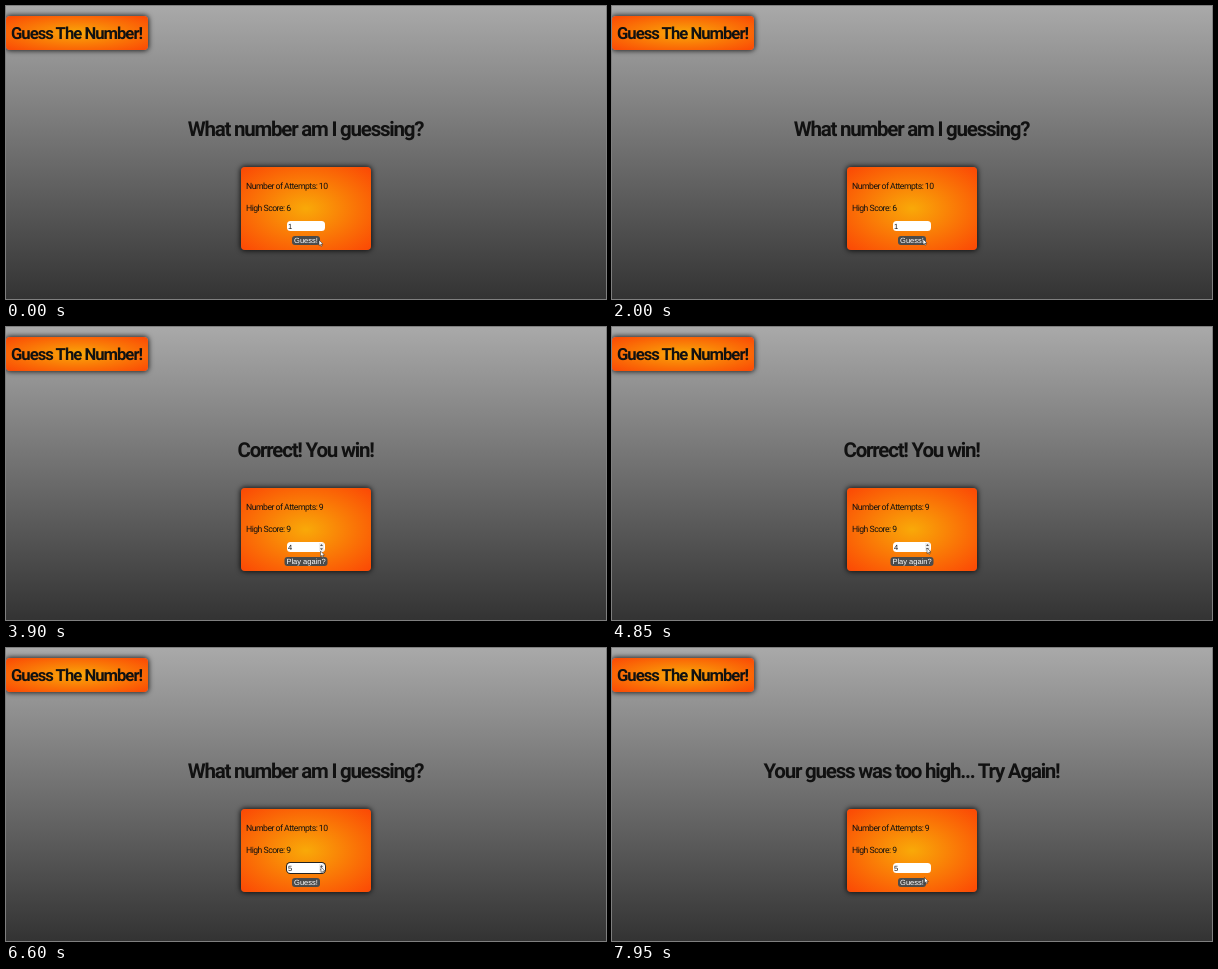
These frames come from a looping animation (600x293 px, 8000 ms). An HTML page:

```html
<!DOCTYPE html>
<html lang="en">
<head>
<meta charset="utf-8">
<title>Guess The Number!</title>
<style>
  html, body { margin: 0; width: 100%; height: 100%; overflow: hidden; }
  body { position: relative; background: linear-gradient(#a9a9a9, #333); }
  div, svg { position: absolute; box-sizing: border-box; }
  .panel {
    border-radius: 4px;
    background: radial-gradient(#f9a908, #fb4705);
    box-shadow: 0 0 5px 1px rgba(0, 0, 0, .75);
  }
  #banner { left: 0; top: 10px; width: 142px; height: 34px; }
  #card { left: 235px; top: 161px; width: 130px; height: 83px; }
  #field { left: 281px; top: 215px; width: 38px; height: 10px; border-radius: 3.5px; background: #fff; }
  #field.focused { box-shadow: 0 0 0 1px #222; }
  svg { left: 0; top: 0; width: 600px; height: 293px; }
  text { text-rendering: geometricPrecision; fill: #111; }
  .display { font-family: Roboto, sans-serif; letter-spacing: -.06em; }
  .bold { font-weight: 700; }
  .label { font-size: 8.7px; }
  .control { font: 7.5px "Liberation Sans", Arial, sans-serif; }
  .middle { text-anchor: middle; }
</style>
</head>
<body>
<div id="banner" class="panel"></div>
<div id="card" class="panel"></div>
<div id="field"></div>
<svg viewBox="0 0 600 293">
  <text class="display bold" x="5" y="33" font-size="16.7">Guess The Number!</text>
  <text id="message" class="display bold middle" x="299.5" y="130" font-size="20.5"></text>
  <text id="attempts" class="display label" x="240" y="183"></text>
  <text id="score" class="display label" x="240" y="205"></text>
  <text id="value" class="control" x="282" y="222.7"></text>
  <g id="spinner">
    <rect x="313" y="216" width="5" height="8" fill="#eee"/>
    <path d="M314 219l1.5-2 1.5 2zM314 221.3l1.5 2 1.5-2z" fill="#555"/>
  </g>
  <rect id="button" y="230" height="9" rx="3" fill="#4b4b4b"/>
  <text id="action" class="control middle" x="300" y="236.8" style="fill:#fff"></text>
  <path id="arrow" d="M0 0V5.6L1.3 4.4 2.2 6.4 3.1 6 2.2 4.1H4z" fill="#fff" stroke="#222" stroke-width=".5"/>
  <path id="beam" d="M-1-3.5H1M0-3.5V3.5M-1 3.5H1" fill="none" stroke="#444" stroke-width=".7"/>
</svg>
<script>
const LOOP = 8000, STEP = 50;
const el = id => document.getElementById(id);

// Each entry changes part of the game state at its time.
const events = [
  [0, { message: "What number am I guessing?", attempts: 10, score: 6, value: 1, action: "Guess!", focused: false }],
  [2050, { message: "Your guess was too low... Try Again!", attempts: 9 }],
  [2700, { value: 2, focused: true }],
  [2950, { value: 3 }],
  [3150, { value: 4 }],
  [3600, { message: "Correct! You win!", score: 9, action: "Play again?", focused: false }],
  [5800, { message: "What number am I guessing?", attempts: 10, action: "Guess!" }],
  [6400, { value: 5, focused: true }],
  [7300, { message: "Your guess was too high... Try Again!", attempts: 9, focused: false }]
];

// Pointer stops: time, x, y.
const stops = [
  [0, 313, 234], [700, 313, 234], [1200, 311, 223], [1500, 311, 223],
  [1850, 311, 233], [2150, 311, 233], [2550, 315, 219], [3200, 315, 219],
  [3500, 312, 232], [3700, 312, 232], [3900, 314.5, 224], [4300, 315, 221],
  [5200, 315, 221], [5600, 312, 233], [5900, 312, 233], [6250, 315, 219],
  [6750, 315, 219], [7150, 313, 232], [7500, 313, 232], [7900, 312.5, 229.5],
  [LOOP, 312.5, 229.5]
];

function pointerAt(t) {
  const i = stops.findIndex(s => s[0] > t);
  const [t0, x0, y0] = stops[i - 1], [t1, x1, y1] = stops[i];
  const p = (t - t0) / (t1 - t0), e = p * p * (3 - 2 * p);
  return [x0 + (x1 - x0) * e, y0 + (y1 - y0) * e];
}

const show = (id, on) => el(id).setAttribute("visibility", on ? "visible" : "hidden");

function draw(t) {
  const state = Object.assign({}, ...events.filter(e => e[0] <= t).map(e => e[1]));
  el("message").textContent = state.message;
  el("attempts").textContent = "Number of Attempts: " + state.attempts;
  el("score").textContent = "High Score: " + state.score;
  el("value").textContent = state.value;
  el("action").textContent = state.action;
  el("field").classList.toggle("focused", state.focused);

  const width = state.action === "Guess!" ? 28 : 43;
  el("button").setAttribute("x", 300 - width / 2);
  el("button").setAttribute("width", width);

  const [x, y] = pointerAt(t);
  const overField = y < 226, typing = overField && x < 313;
  show("spinner", overField || state.focused);
  show("beam", typing);
  show("arrow", !typing);
  for (const id of ["beam", "arrow"]) el(id).setAttribute("transform", `translate(${x} ${y})`);
}

function frame() {
  draw(Math.floor(performance.now() % LOOP / STEP) * STEP);
  requestAnimationFrame(frame);
}
frame();
</script>
</body>
</html>
```
